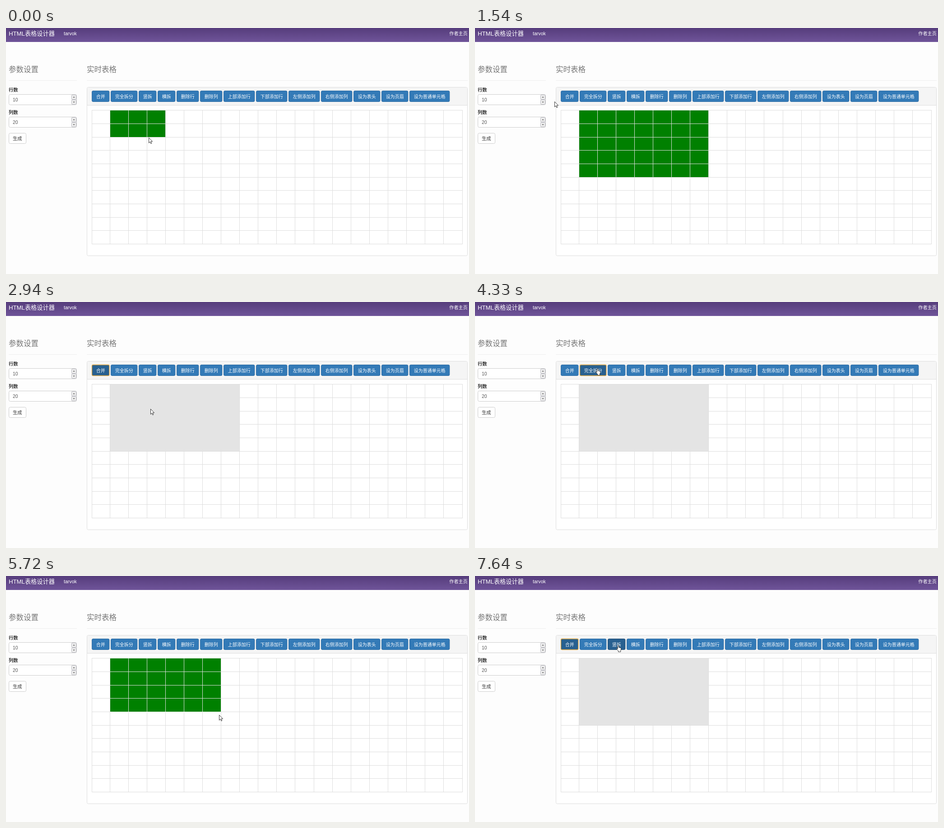
Animation of 1026x546 px, one loop 8 s. Source, as an HTML page:

```html
<!DOCTYPE html>
<html lang="zh">
<head>
<meta charset="utf-8">
<style>
  html, body { margin: 0; width: 100%; height: 100%; overflow: hidden; background: #fdfdfd; }
  svg { display: block; width: 1026px; height: 546px; font: 10px "Liberation Sans", "Noto Sans CJK SC", "Noto Sans CJK", sans-serif; }
  .btn rect { fill: #337ab7; stroke: #2e6da4; }
  .btn.hover rect, .btn.focus rect { fill: #286090; stroke: #204d74; }
  .btn.focus rect { stroke: #dba23c; stroke-width: 1.3; }
  .pointer path { fill: #fff; stroke: #222; stroke-width: .9; stroke-linejoin: round; }
  .crisp { shape-rendering: crispEdges; }
</style>
</head>
<body>
<script>
const DURATION = 8000;
const COLS = 20, ROWS = 10;
const MERGED_COLS = 7, MERGED_ROWS = 5;

const colX = i => Math.floor(i < 12 ? 190 + 40.91 * i : 682 + 41.13 * (i - 12));
const rowY = i => Math.floor(182.9 + 29.64 * i);

const rect = (x, y, w, h, attrs) => `<rect x="${x}" y="${y}" width="${w}" height="${h}" ${attrs}/>`;
const text = (x, y, size, color, str, attrs = '') =>
  `<text x="${x}" y="${y}" font-size="${size}" fill="${color}" ${attrs}>${str}</text>`;

// Toolbar
const labels = ['合并', '完全拆分', '竖拆', '横拆', '删除行', '删除列', '上部添加行', '下部添加行',
  '左侧添加列', '右侧添加列', '设为表头', '设为页眉', '设为普通单元格'];
let nextX = 190;
const buttons = labels.map(label => {
  const button = { label, x: nextX, w: label.length * 10 + 19.4 };
  nextX += label.length * 10 + 22;
  return button;
});
const toolbar = buttons.map(({ label, x, w }) =>
  `<g class="btn">${rect(x + .5, 139.5, w - 1, 24, 'rx="2.5"')}${text(x + 9.7, 155.8, 10, '#fff', label)}</g>`).join('');

// Sidebar number field with its spinner
const numberField = (y, label, value) =>
  text(6, y - 5.8, 10.3, '#333', label, 'font-weight="700"') +
  rect(6.5, y + .5, 150, 23, 'rx="3" fill="#fff" stroke="#ccc"') +
  text(15, y + 16, 10.3, '#555', value) +
  [1, 12].map((dy, i) => {
    const tip = y + dy + (i ? 7 : 4), base = y + dy + (i ? 4.5 : 6.5);
    return rect(145.5, y + dy + .5, 10, 10, 'rx="1" fill="#eee" stroke="#b8b8c0"') +
      `<path d="M148.5 ${base}h4L150.5 ${tip}Z" fill="#555"/>`;
  }).join('');

let gridPath = '';
for (let i = 0; i <= COLS; i++) gridPath += `M${colX(i) + .5} ${rowY(0)}V${rowY(ROWS) + 1}`;
for (let i = 0; i <= ROWS; i++) gridPath += `M${colX(0)} ${rowY(i) + .5}H${colX(COLS) + 1}`;

const cellBlock = (id, cols, rows, color) =>
  rect(colX(1) + 1, rowY(0) + 1, colX(1 + cols) - colX(1) - 1, rowY(rows) - rowY(0) - 1, `id="${id}" fill="${color}"`);

document.body.innerHTML = `<svg viewBox="0 0 1026 546">
  <defs><linearGradient id="bar" x2="0" y2="1">
    <stop stop-color="#563d7c"/><stop offset="1" stop-color="#6f5499"/>
  </linearGradient></defs>
  ${rect(0, 0, 1026, 31, 'fill="url(#bar)"')}
  ${text(6, 17, 13.2, '#fff', 'HTML表格设计器')}
  ${text(128, 16.3, 10.6, '#fff', 'tarvok')}
  ${text(1023, 16.3, 10.2, '#fff', '作者主页', 'text-anchor="end"')}
  ${text(6, 98, 16.5, '#777', '参数设置', 'font-weight="300"')}
  ${text(179, 98, 16.5, '#777', '实时表格', 'font-weight="300"')}
  <path d="M6 116.5H157M179 116.5H1023" stroke="#eee"/>
  ${numberField(147, '行数', 10)}
  ${numberField(197, '列数', 20)}
  ${rect(6.5, 233.5, 38, 23, 'rx="3" fill="#fff" stroke="#ccc"')}
  ${text(15, 248.8, 10.3, '#333', '生成')}
  ${rect(179.5, 131.5, 843, 374, 'rx="3" fill="#fff" stroke="#ddd"')}
  <path d="M180 171V134.5q0-2.5 2.5-2.5h837q2.5 0 2.5 2.5V171Z" fill="#f5f5f5"/>
  <path d="M180 171.5H1022" stroke="#ddd"/>
  ${toolbar}
  <g class="crisp">
    ${cellBlock('selection', 1, 1, '#008000')}
    <path d="${gridPath}" fill="none" stroke="#ddd"/>
    ${cellBlock('merged', MERGED_COLS, MERGED_ROWS, '#e4e4e4')}
  </g>
  <g class="pointer">
    <path id="arrow" d="M.5.5V12.2L3.2 9.6 5 13.8 6.8 13 5 8.9H8.6Z"/>
    <path id="hand" d="M3.2 1.5Q4.4-.2 5.6 1.5V5.4L9.6 6.5Q11 7 10.8 9L9.7 12.6V15.4H4.6V13.2L.8 9Q.2 7.4 1.8 7.6L3.2 9Z"/>
  </g>
</svg>`;

const [selection, merged, arrow, hand] =
  ['selection', 'merged', 'arrow', 'hand'].map(id => document.getElementById(id));
const buttonNodes = document.querySelectorAll('.btn');

// The screen refreshes in bursts: start, end, number of refreshes
const bursts = [[150, 840, 6], [1120, 1660, 5], [1940, 2080, 2], [2360, 2940, 5], [3650, 3920, 3],
  [4330, 5290, 8], [5420, 6400, 8], [6520, 7490, 8], [7640, 7641, 2]];

function lastRefresh(t) {
  let result = 0;
  for (const [start, end, count] of bursts) {
    if (t < start) break;
    const step = (end - start) / (count - 1);
    result = start + step * Math.min(count - 1, Math.floor((t - start) / step + 1e-6));
  }
  return result;
}

// Pointer path: time, x, y
const path = [
  [0, 316, 243], [150, 335, 255], [564, 486, 325], [702, 494, 329], [840, 495, 327],
  [1120, 470, 318], [1255, 390, 270], [1390, 250, 190], [1525, 176, 163], [1660, 198, 151],
  [2080, 198, 151], [2360, 205, 160], [2505, 240, 190], [2795, 325, 245], [2940, 320, 237],
  [3650, 312, 220], [3785, 285, 172], [3920, 267, 147], [4467, 267, 147], [4604, 262, 160],
  [4741, 250, 180], [4878, 245, 190], [5016, 252, 194], [5290, 310, 219], [5420, 350, 240],
  [5700, 472, 308], [5840, 482, 315], [5980, 440, 290], [6260, 265, 188], [6400, 226, 167],
  [6520, 208, 157], [6659, 198, 151], [6937, 198, 151], [7074, 212, 153], [7213, 255, 151],
  [7351, 300, 154], [7490, 314, 155], [7640, 313, 153]
];

function pointerAt(t) {
  const i = path.findIndex(p => p[0] > t);
  if (i < 0) return path[path.length - 1].slice(1);
  const [t0, x0, y0] = path[i - 1], [t1, x1, y1] = path[i];
  const k = (t - t0) / (t1 - t0);
  return [Math.round(x0 + (x1 - x0) * k), Math.round(y0 + (y1 - y0) * k)];
}

const show = (node, on) => node.setAttribute('visibility', on ? 'visible' : 'hidden');

function render(time) {
  const t = lastRefresh(time);
  const [x, y] = pointerAt(t);
  const hovered = y >= 139 && y < 164
    ? buttons.findIndex(b => x + 4 >= b.x && x + 4 < b.x + b.w) : -1;
  const focused = t < 1930 ? -1 : t < 4320 ? 0 : t < 5000 ? 1 : t < 6750 ? -1 : 0;

  buttonNodes.forEach((node, i) => {
    node.classList.toggle('hover', i === hovered);
    node.classList.toggle('focus', i === focused);
  });

  const selecting = t < 2070 || (t > 5000 && t < 6900);
  show(selection, selecting);
  show(merged, (t > 2070 && t < 4400) || t > 6900);
  if (selecting) {
    const [dragX, dragY] = pointerAt(Math.min(t, t < 2070 ? 840 : 5840));
    let cols = 1, rows = 1;
    while (colX(cols + 1) <= dragX) cols++;
    while (rowY(rows) <= dragY - 9) rows++;
    selection.setAttribute('width', colX(1 + cols) - colX(1) - 1);
    selection.setAttribute('height', rowY(rows) - rowY(0) - 1);
  }

  show(hand, hovered >= 0);
  show(arrow, hovered < 0);
  for (const node of [hand, arrow]) node.setAttribute('transform', `translate(${x} ${y})`);
}

const startTime = performance.now();
(function tick() {
  render((performance.now() - startTime) % DURATION);
  requestAnimationFrame(tick);
})();
</script>
</body>
</html>
```
